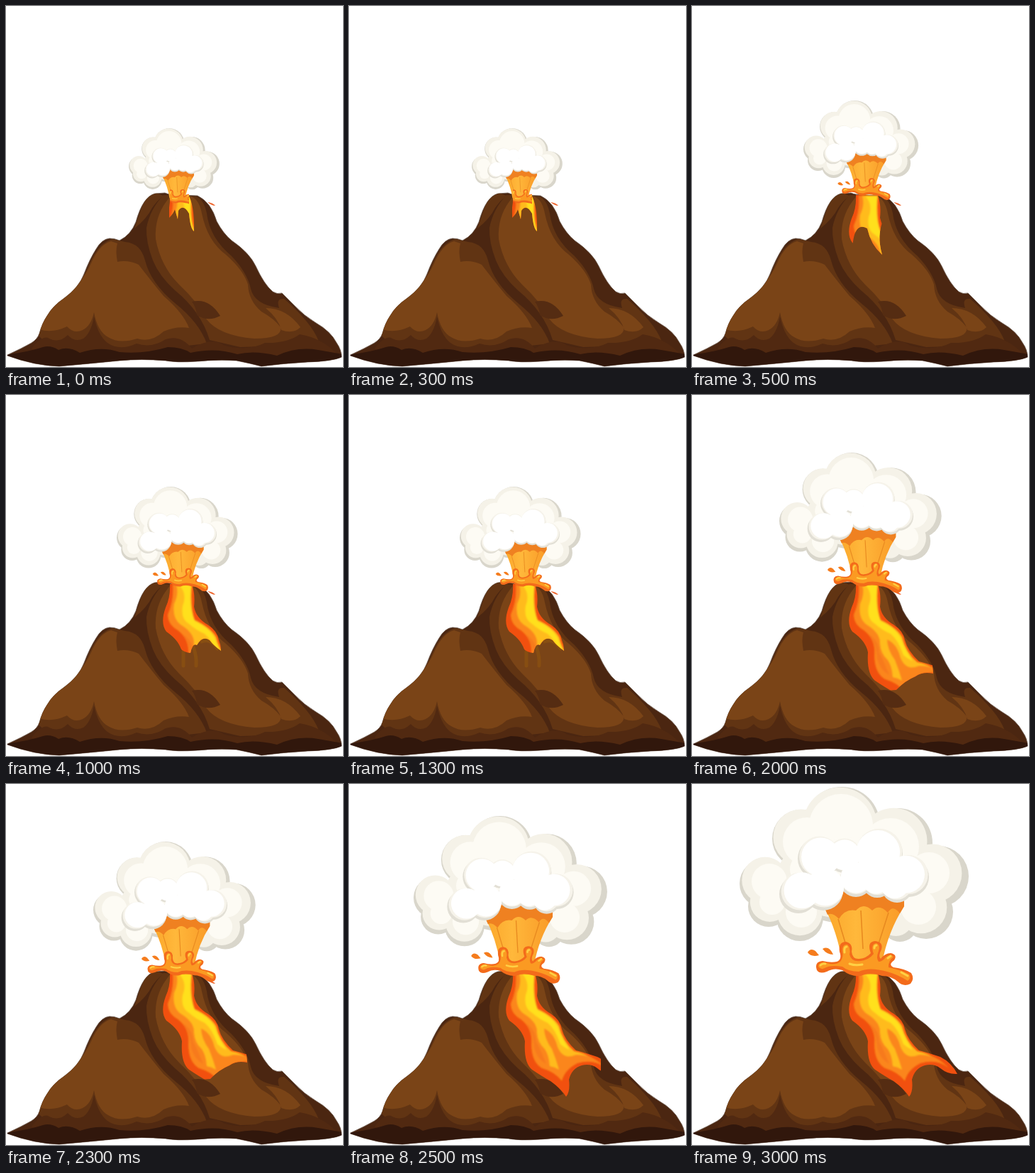
Write an HTML page that moves like this. It is 475 px wide and 508 px high and loops after 3500 ms.

```html
<!DOCTYPE html>
<html lang="en">
<head>
<meta charset="utf-8">
<title>Erupting volcano</title>
<style>
html, body { margin: 0; width: 100%; height: 100%; overflow: hidden; background: #fff; }
svg { position: absolute; left: 0; top: 0; width: 475px; height: 508px; }
.lava, .plume, .splash, .speck, .wisp { animation: 3500ms step-end infinite; }
.lava { animation-name: flow; }
.plume { animation-name: grow; transform-origin: 67px 4px; }
.splash { animation-name: burst; }
.speck { animation-name: speck; }
.wisp { animation-name: wisp; }

@keyframes grow {
  0% { transform: translate(106px, 168px) scale(.396); }
  14.2857% { transform: translate(90px, 129px) scale(.502); }
  28.5714% { transform: translate(89px, 125px) scale(.528); }
  42.8571% { transform: translate(75px, 107px) scale(.592); }
  57.1429% { transform: translate(56px, 77px) scale(.708); }
  71.4286% { transform: translate(24px, 41px) scale(.845); }
  85.7143%, 100% { transform: none; }
}
@keyframes flow {
  0% { clip-path: path("M230 264H256Q266 280 265 317Q260 314 258 292Q250 278 243 288L242 300L238 286Q236 292 230 298Z"); }
  14.2857% { clip-path: path("M215 262H270V300Q260 322 268 350Q252 336 247 313Q228 302 226 342L215 335Z"); }
  28.5714% { clip-path: path("M210 262H270L300 325L303 360Q292 352 287 345Q277 338 269 352Q263 348 260 363Q250 362 245 356L210 340Z"); }
  42.8571% { clip-path: path("M210 262H270L303 335L301 352L292 348Q286 358 294 371Q287 378 298 390L301 408L291 407L284 400L275 405Q262 404 248 398L210 340Z"); }
  57.1429% { clip-path: path("M210 262H270L338 370L340 392Q325 389 315 396Q300 402 288 415L248 418L210 340Z"); }
  71.4286% { clip-path: path("M200 260H355V445H200Z"); }
  85.7143%, 100% { clip-path: path("M200 260H380V445H200Z"); }
}
@keyframes burst {
  0% { clip-path: inset(0 20% 0 34%); }
  14.2857%, 100% { clip-path: none; }
}
@keyframes speck {
  0% { opacity: 1; }
  71.4286%, 100% { opacity: 0; }
}
@keyframes wisp {
  0% { opacity: 0; }
  28.5714% { opacity: .65; }
  42.8571%, 100% { opacity: 0; }
}
</style>
</head>
<body>
<!-- Mountain -->
<svg viewBox="0 0 475 508">
  <defs>
    <path id="hill" d="M2 491Q22 482 36 474Q44 469 47 461Q51 446 58 436Q66 422 81 412Q103 396 110 377Q118 356 127 342Q135 328 146 327Q153 327 160 330Q176 322 183 304Q193 268 210 264L224 263Q230 266 245 266L270 267Q289 276 297 303Q306 320 318 330Q343 347 352 366Q364 392 376 402Q382 406 389 404L405 420Q420 436 437 446Q458 458 466 474Q473 484 473 494Q460 500 425 501Q390 503 360 507Q345 503 325 499Q300 497 270 500Q240 502 225 499Q190 496 160 499Q120 503 75 507Q40 506 2 492Z"/>
    <clipPath id="inside"><use href="#hill"/></clipPath>
  </defs>
  <use href="#hill" fill="#4b2611" stroke="#6d5b50" stroke-width=".8"/>
  <g clip-path="url(#inside)">
    <g fill="#613413">
      <path d="M222 266Q203 286 198 312Q197 332 207 358Q216 380 238 400Q275 430 287 470L330 480L400 478L440 470Q430 445 392 412Q380 411 385 425Q350 420 345 398Q340 375 318 352Q287 326 283 292Q279 272 268 268Z"/>
      <path d="M212 263Q196 268 190 287L181 313Q198 300 206 284Q213 274 222 267Z"/>
      <path d="M150 328Q130 334 118 362Q105 395 75 414Q52 432 44 462L60 478Q120 488 200 484L283 475Q272 445 238 418Q204 390 196 358Q190 334 168 332Z"/>
    </g>
    <g fill="#7a4417">
      <path d="M226 275Q209 298 211 328Q218 366 244 392Q270 416 282 440Q300 464 350 468Q390 468 387 452Q378 440 360 430Q342 415 341 392Q335 372 310 350Q284 331 276 292Q272 270 258 267H232Z"/>
      <path d="M366 425Q395 425 415 452Q405 462 388 456Q384 440 366 425Z"/>
      <path d="M148 331Q131 336 120 362Q106 393 78 413Q55 430 47 455Q65 461 86 451Q96 462 108 456Q120 450 124 431Q129 458 144 466Q160 476 185 468Q205 474 222 458Q240 450 258 453Q250 432 222 408Q203 385 187 364Q172 357 157 360Q154 344 157 334Z"/>
    </g>
    <path fill="#552c12" d="M262 416Q286 410 302 436Q285 445 269 435Q268 424 262 416Z"/>
    <path fill="#512911" d="M36 482Q52 462 61 468Q75 475 87 463Q97 474 109 468Q120 460 124 437Q130 464 143 474Q160 486 184 475Q205 482 225 469Q246 462 262 482Q290 465 308 478Q342 486 365 474Q396 475 414 462Q444 467 465 488L390 500Q220 490 60 500Z"/>
    <path fill="#31170c" d="M0 491Q34 486 52 480Q63 477 74 484Q88 478 104 488Q134 478 160 487Q195 490 228 480Q248 480 260 488Q295 480 326 490Q350 484 382 492Q410 479 440 484L475 490V508H0Z"/>
  </g>
  <path class="speck" fill="#ee672f" d="M284 276Q292 277 295 281Q290 281 284 276Z"/>
  <path class="wisp" fill="none" stroke="#8f5410" stroke-width="5" stroke-linecap="round" d="M250 361V381M264 354Q269 368 268 381M276 347Q289 342 298 357"/>
</svg>

<!-- Lava stream -->
<svg class="lava" viewBox="0 0 475 508">
  <defs>
    <filter id="soft"><feGaussianBlur stdDeviation="1.1"/></filter>
  </defs>
  <path fill="#f1500f" d="M231 266Q232 284 225 299Q217 321 226 333Q245 346 248 362Q246 392 258 402Q273 412 284 418Q299 429 306 440Q312 433 310 416Q314 400 328 396Q341 393 350 400Q361 409 374 408Q366 392 350 384Q332 378 320 375Q304 360 300 345Q298 332 284 323Q268 314 265 298Q267 280 262 267Z"/>
  <g filter="url(#soft)">
    <path fill="#fb861a" d="M235 267Q237 288 228 309Q228 323 242 331Q259 344 257 366Q257 391 272 400Q290 405 300 418Q304 402 322 393Q346 386 362 400Q346 382 318 376Q302 363 297 341Q290 328 266 316Q260 298 262 268Z"/>
    <path fill="#ffbb1c" d="M240 267Q244 280 237 294Q234 314 246 323Q266 335 265 350Q266 364 276 373Q282 382 283 397Q290 398 296 402Q292 388 286 373Q275 358 275 344Q289 350 294 370Q302 389 320 381Q332 381 338 384Q331 378 317 376Q301 362 296 341Q288 327 266 317Q259 299 262 267Z"/>
    <path fill="#ffe01f" d="M244 267Q256 280 249 297Q246 315 258 322Q268 331 280 336Q291 345 298 366Q305 372 311 374Q300 359 294 341Q286 327 266 318Q257 300 261 267Z"/>
    <path fill="#f77a1d" d="M250 337Q264 347 264 362Q272 378 278 394Q266 388 261 372Q260 352 250 337Z"/>
  </g>
</svg>

<!-- Smoke, fire and splash -->
<svg viewBox="0 0 475 508">
  <defs>
    <g id="puffs">
      <circle cx="101" cy="140" r="34"/>
      <circle cx="108" cy="172" r="29"/>
      <circle cx="152" cy="188" r="33"/>
      <circle cx="154" cy="77" r="41"/>
      <circle cx="211" cy="58" r="54"/>
      <circle cx="290" cy="83" r="49"/>
      <circle cx="347" cy="130" r="43"/>
      <circle cx="330" cy="180" r="38"/>
      <circle cx="293" cy="197" r="25"/>
      <ellipse cx="225" cy="132" rx="105" ry="65"/>
    </g>
    <g id="front">
      <circle cx="150" cy="155" r="27"/>
      <circle cx="178" cy="105" r="29"/>
      <circle cx="214" cy="102" r="23"/>
      <circle cx="264" cy="98" r="33"/>
      <circle cx="306" cy="131" r="28"/>
      <circle cx="185" cy="150" r="28"/>
      <circle cx="231" cy="136" r="23"/>
      <circle cx="261" cy="139" r="21"/>
      <circle cx="289" cy="145" r="22"/>
    </g>
    <linearGradient id="fire" x1="0" x2="1" y1="0" y2="0">
      <stop offset="0" stop-color="#fba62b"/>
      <stop offset=".4" stop-color="#ffb83b"/>
      <stop offset="1" stop-color="#f99a27"/>
    </linearGradient>
  </defs>
  <g class="plume">
    <use href="#puffs" fill="#d9d6cb"/>
    <use href="#puffs" fill="#f5f2e8" transform="translate(6 1) scale(.96)"/>
    <g fill="#fdfbf4">
      <circle cx="109" cy="137" r="25"/>
      <circle cx="113" cy="166" r="18"/>
      <circle cx="154" cy="180" r="22"/>
      <circle cx="162" cy="81" r="34"/>
      <circle cx="210" cy="59" r="45"/>
      <circle cx="280" cy="88" r="40"/>
      <circle cx="334" cy="125" r="29"/>
      <circle cx="319" cy="173" r="25"/>
      <ellipse cx="230" cy="120" rx="92" ry="45"/>
    </g>
    <path fill="url(#fire)" d="M186 140H299V172Q276 208 268 252Q240 261 212 252Q205 208 186 172Z"/>
    <path fill="#ef8121" d="M186 140H299V172L293 182Q283 169 276 181Q264 168 254 178Q242 166 231 178Q216 175 207 190Q198 180 191 184L186 172Z"/>
    <path fill="none" stroke="#e88a20" stroke-width="1.6" d="M206 190L221 240M238 178L241 232M277 181L261 231"/>
    <use href="#front" fill="#e2dfd5"/>
    <use href="#front" fill="#f6f3ea" transform="translate(5 -1) scale(.981)"/>
    <use href="#front" fill="#fff" transform="translate(14 4) scale(.94)"/>
    <g class="splash">
      <path fill="#f36b1b" d="M176 262Q172 250 184 249Q196 252 204 250Q212 247 208 236Q206 222 217 222Q227 224 225 236Q226 247 236 246Q246 245 252 238Q246 222 258 221Q270 222 267 233Q262 242 266 246Q272 238 280 238Q290 240 285 248Q276 254 284 258Q300 260 309 266Q314 274 308 281Q298 286 290 278Q280 270 268 270Q250 264 238 270Q225 272 212 262Q200 258 190 264Q180 268 176 262Z"/>
      <path fill="#fb9a22" d="M178 257Q179 250 190 252Q202 256 209 250Q214 244 212 234Q212 225 219 226Q224 231 222 240Q225 251 238 249Q250 247 256 239Q251 225 260 224Q266 227 263 235Q259 245 263 250Q268 250 273 244Q279 239 284 243Q276 250 277 258Q295 262 306 268Q309 274 304 277Q290 268 275 264Q250 257 235 264Q220 264 212 257Q195 254 187 259Q182 262 178 257Z"/>
      <path fill="none" stroke="#ffd044" stroke-width="3" stroke-linecap="round" d="M181 255Q184 252 188 253M215 237Q214 229 218 229M257 231Q257 227 260 227M222 253Q230 256 240 254M276 245L280 242M295 265L304 270"/>
      <g fill="#f57c1d">
        <path d="M163 237Q167 230 174 235L179 241Q168 244 163 237Z"/>
        <path d="M184 232Q193 227 199 240Q190 240 184 232Z"/>
      </g>
    </g>
  </g>
</svg>
</body>
</html>
```
